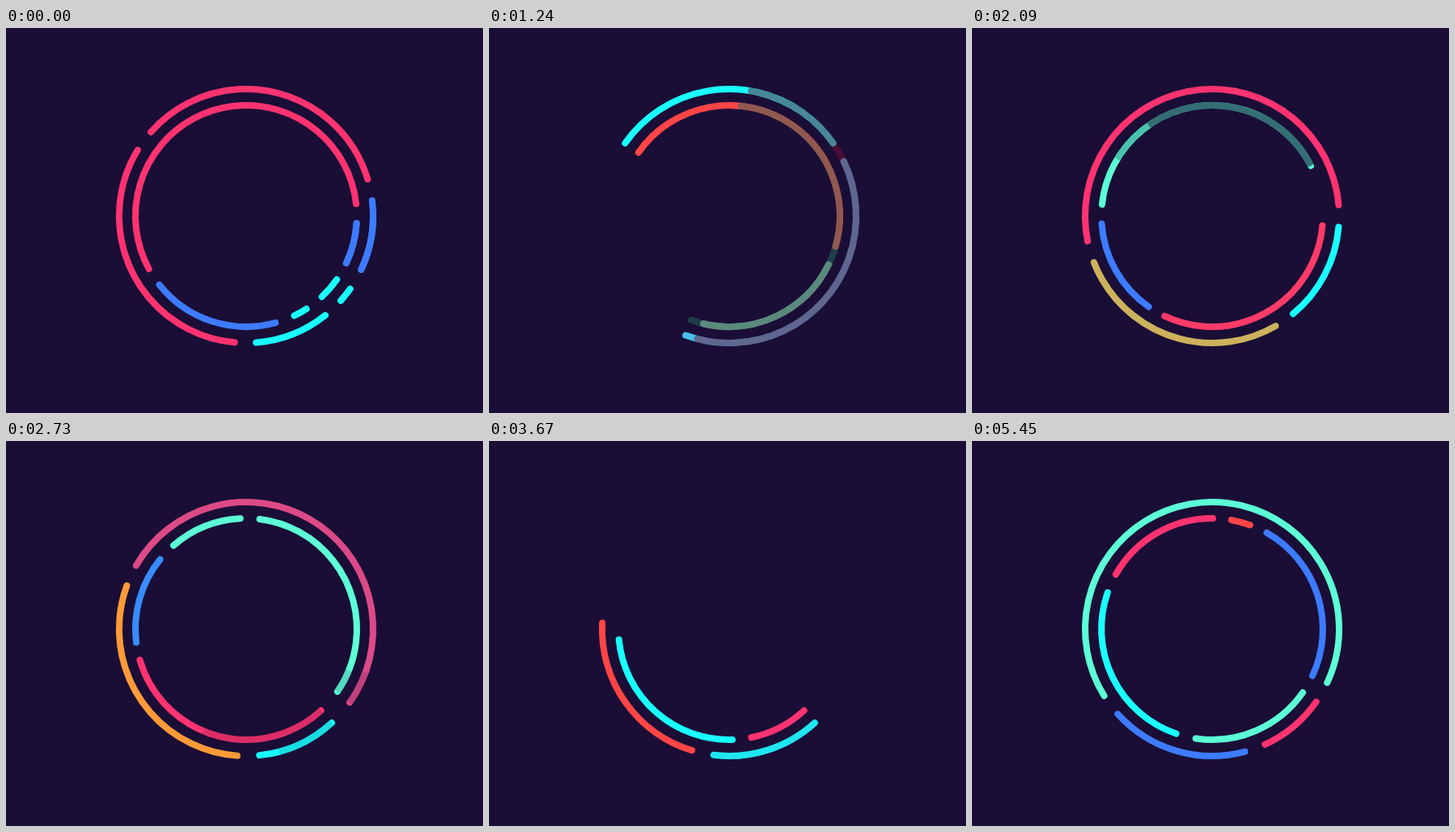
Animation of 586x473 px, one loop 6330 ms. Source, as an HTML page with a canvas:

```html
<!DOCTYPE html>
<html lang="en">
<head>
<meta charset="utf-8">
<title>Rings</title>
<style>
  html, body { margin: 0; width: 100%; height: 100%; overflow: hidden; background: #1a0e36; }
  canvas { display: block; }
</style>
</head>
<body>
<canvas id="stage" width="586" height="473"></canvas>
<script>
const ctx = document.getElementById('stage').getContext('2d');
const LOOP = 6330, CX = 295, CY = 231, BG = '#1a0e36';
const RADII = [156, 136];
const PINK = '#ff3370', BLUE = '#3d7bff', CYAN = '#19ffff', RED = '#ff4545',
      MINT = '#5cffd6', ORANGE = '#ff9a38';

// Each state: outer and inner arcs as [from, to, colour], in degrees clockwise.
const empty = [[], []];
const first = [
  [[35, 41.8, CYAN], [51.4, 85.5, CYAN], [95.2, 211.3, PINK], [221.4, 343.2, PINK], [353, 385, BLUE]],
  [[35, 46.8, CYAN], [57, 64.2, CYAN], [74.6, 141.6, BLUE], [151.4, 353.7, PINK], [363.8, 385.2, BLUE]]
];
const second = [
  [[215, 325, CYAN], [334.5, 563, '#46c0ee']],
  [[215, 376, RED], [386, 463.5, '#91a8a0'], [473.5, 563, MINT]]
];
const third = [
  [[5, 50.4, CYAN], [60, 158.6, '#cdb25c'], [168.6, 355, PINK]],
  [[5, 115.4, '#ff3b68'], [125, 176, BLUE], [186, 333, MINT]]
];
const fourth = [
  [[47.6, 84, CYAN], [94, 200, ORANGE], [210, 395.3, '#dc4a86']],
  [[47.4, 163.7, PINK], [173, 219, '#388cff'], [229, 267, MINT], [277, 394.4, MINT]]
];
const fifth = [
  [[47.6, 97, '#1fe6f0'], [107, 260, RED], [270, 395, BLUE]],
  [[47.4, 78.4, PINK], [88.3, 174.5, CYAN], [184.5, 395, MINT]]
];
const sixth = [
  [[36.3, 228, BLUE], [238.3, 385.4, RED]],
  [[36, 374.5, RED], [384, 386, MINT]]
];
const last = [
  [[35, 65.4, PINK], [75, 138, BLUE], [148.2, 385, MINT]],
  [[35, 98.5, MINT], [109, 199.3, CYAN], [209.5, 270.4, PINK], [280, 290, RED], [299.6, 385, BLUE]]
];

// Translucent tints over a fresh state: [ring, from, to, colour, alpha].
const secondTint = [[0, 280, 464.5, '#780f32', .5], [1, 276, 563, '#236e5a', .5]];
const thirdTint = [[1, 211, 235, BG, .25], [1, 235, 333, BG, .6]];
const fourthTint = [[0, 47.6, 75, BG, .14], [1, 47.4, 113, BG, .15],
                    [0, 380, 395.3, BG, .15], [1, 382, 394.4, BG, .15]];

// Clockwise wipes from the angle `base`.
const wipes = [
  { at: 240, dur: 610, base: 30, to: empty },
  { at: 880, dur: 610, base: 208, to: second, tint: secondTint },
  { at: 1520, dur: 610, base: 0, to: third, tint: thirdTint },
  { at: 2180, dur: 610, base: 41, to: fourth, tint: fourthTint },
  { at: 2820, dur: 420, base: 41, to: empty },
  { at: 3390, dur: 610, base: 42, to: fifth },
  { at: 4030, dur: 610, base: 30, to: sixth },
  { at: 4670, dur: 540, base: 30, to: last }
];

const ease = x => x < .5 ? 4 * x ** 3 : 1 - 4 * (1 - x) ** 3;
const clamp = x => Math.max(0, Math.min(1, x));

function arc(ring, from, to, color, cap = 'round') {
  const rad = Math.PI / 180;
  ctx.beginPath();
  ctx.arc(CX, CY, RADII[ring], from * rad, to * rad);
  ctx.strokeStyle = color;
  ctx.lineCap = cap;
  ctx.stroke();
}

function drawState(state, lo, hi) {
  state.forEach((arcs, ring) => {
    for (const [from, to, color] of arcs) {
      for (let turn = -720; turn <= 720; turn += 360) {
        const a = Math.max(from + turn, lo), b = Math.min(to + turn, hi);
        if (b > a) arc(ring, a, b, color);
      }
    }
  });
}

function drawTint(tint, head, strength) {
  for (const [ring, from, to, color, alpha] of tint) {
    const end = Math.min(to, head);
    if (end <= from) continue;
    ctx.globalAlpha = alpha * strength;
    arc(ring, from, end, color, color === BG ? 'butt' : 'round');
  }
  ctx.globalAlpha = 1;
}

function draw(t) {
  ctx.fillStyle = BG;
  ctx.fillRect(0, 0, 586, 473);
  ctx.lineWidth = 8;
  let i = wipes.length - 1;
  while (i >= 0 && wipes[i].at > t) i--;
  if (i < 0) return drawState(first, 0, 360 + 30);

  const { at, dur, base, to, tint } = wipes[i];
  const old = i ? wipes[i - 1].to : first;
  const sweep = 360 * ease(clamp((t - at) / dur));
  const head = base + sweep;
  drawState(old, head + Math.min(sweep, 10), base + 360);
  drawState(to, base, head);
  if (tint) drawTint(tint, head, clamp((at + 640 - t) / 60));
}

const start = performance.now();
function tick() {
  draw((performance.now() - start) % LOOP);
  requestAnimationFrame(tick);
}
tick();
</script>
</body>
</html>
```
